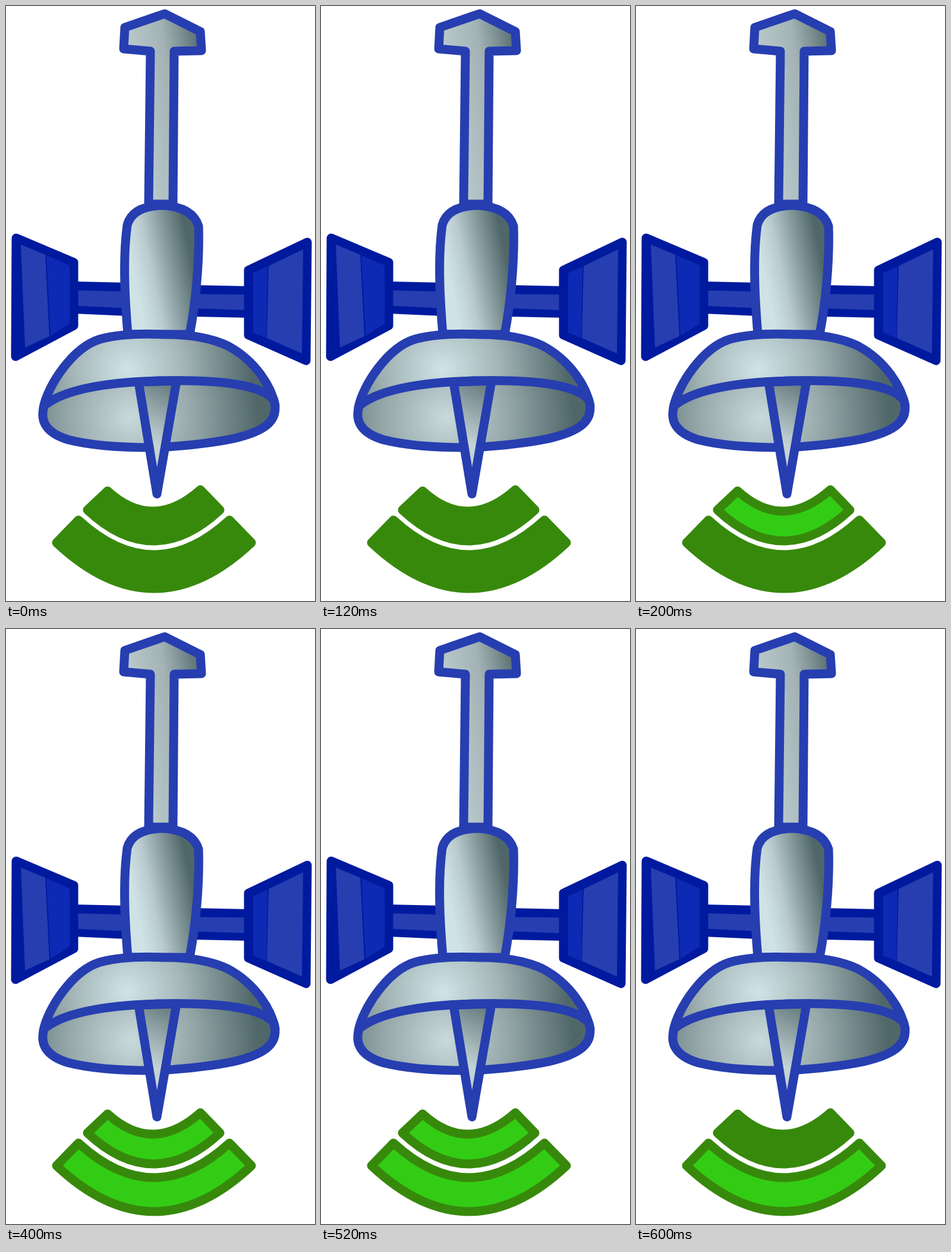
Recreate the animation shown at these times as an HTML page. Size 520 by 1000 pixels, loop 800 ms.

```html
<!DOCTYPE html>
<html lang="en">
<head>
<meta charset="utf-8">
<title>Satellite signal</title>
<style>
  html, body { margin: 0; width: 100%; height: 100%; overflow: hidden; background: #fff; }
  svg { display: block; width: 100%; height: 100%; }
  path { stroke-linejoin: round; stroke-linecap: round; }
  .hull { stroke: #263eb0; stroke-width: 15; }
  .panel { fill: #001a9f; stroke: #001a9f; stroke-width: 15; }
  .dark { fill: #001a9f; }
  .mid { fill: #263eb0; }
  .bright { fill: #0d2ab5; }
  .wave { fill: #37890c; stroke: #37890c; stroke-width: 15; }
  .wave.lit { fill: #33cc14; }
</style>
</head>
<body>
<svg viewBox="0 0 520 1000">
  <defs>
    <linearGradient id="headFill" gradientUnits="userSpaceOnUse" x1="205" y1="60" x2="322" y2="42">
      <stop offset="0" stop-color="#b9c9cb"/>
      <stop offset=".5" stop-color="#a3b3b5"/>
      <stop offset="1" stop-color="#5a7073"/>
    </linearGradient>
    <linearGradient id="bodyFill" gradientUnits="userSpaceOnUse" x1="217" y1="460" x2="315" y2="439">
      <stop offset="0" stop-color="#cfe3e6"/>
      <stop offset=".3" stop-color="#b9cbce"/>
      <stop offset="1" stop-color="#50676a"/>
    </linearGradient>
    <radialGradient id="domeFill" gradientUnits="userSpaceOnUse" cx="205" cy="610" r="210">
      <stop offset="0" stop-color="#d0e4e7"/>
      <stop offset=".45" stop-color="#a3b5b7"/>
      <stop offset="1" stop-color="#50676a"/>
    </radialGradient>
    <radialGradient id="bowlFill" gradientUnits="userSpaceOnUse" cx="210" cy="692" r="215">
      <stop offset="0" stop-color="#c8dadc"/>
      <stop offset=".5" stop-color="#94a6a8"/>
      <stop offset="1" stop-color="#50676a"/>
    </radialGradient>
    <linearGradient id="needleFill" gradientUnits="userSpaceOnUse" x1="240" y1="730" x2="284" y2="645">
      <stop offset="0" stop-color="#c3d3d5"/>
      <stop offset="1" stop-color="#6b8083"/>
    </linearGradient>
  </defs>

  <!-- arms -->
  <path class="dark" d="M115 463L205 465V521L115 517ZM315 469L410 471V524L315 522Z"/>
  <path class="mid" d="M121 478L205 480V508L121 504ZM315 484L401 485V511L315 508Z"/>

  <!-- solar panels -->
  <path class="panel" d="M17 390L114 431V537L16 589Z"/>
  <path class="mid" d="M25 401L66 418L73 555L32 574Z"/>
  <path class="bright" d="M68 419L107 436V534L75 554Z"/>
  <path class="panel" d="M507 397L408 444V553L505 596Z"/>
  <path class="bright" d="M416 449L440 438L438 558L416 549Z"/>
  <path class="mid" d="M442 437L500 409L498 584L439 558Z"/>

  <!-- mast, body, dish, needle -->
  <path class="hull" fill="url(#headFill)" d="M267 13L327 43L329 75L283 76L281 333H240L243 76L198 72L200 36Z"/>
  <path class="hull" fill="url(#bodyFill)" d="M205 552C199 480 197 420 204 368Q213 336 264 335Q314 338 324 370C326 430 319 500 309 552Z"/>
  <path class="hull" fill="url(#domeFill)" d="M63 675C70 638 112 574 158 560Q200 549 264 552Q330 551 373 571C420 596 447 640 453 672Q430 630 258 630Q110 636 63 675Z"/>
  <path class="hull" fill="url(#bowlFill)" d="M64 672Q110 634 258 630Q425 626 451 663C461 700 430 716 383 727Q335 737 258 742Q160 743 105 729Q52 713 64 672Z"/>
  <path class="hull" fill="url(#needleFill)" d="M223 632L254 820L287 630Z"/>

  <!-- signal -->
  <path id="near" class="wave" d="M171 815Q247 884 327 813L360 847Q248 951 137 847Z"/>
  <path id="far" class="wave" d="M122 864Q249 980 376 864L413 902Q249 1056 85 902Z"/>
</svg>
<script>
  const near = document.getElementById("near");
  const far = document.getElementById("far");

  function draw() {
    const step = Math.floor(performance.now() % 800 / 200);
    near.classList.toggle("lit", step === 1 || step === 2);
    far.classList.toggle("lit", step >= 2);
    requestAnimationFrame(draw);
  }
  draw();
</script>
</body>
</html>
```
